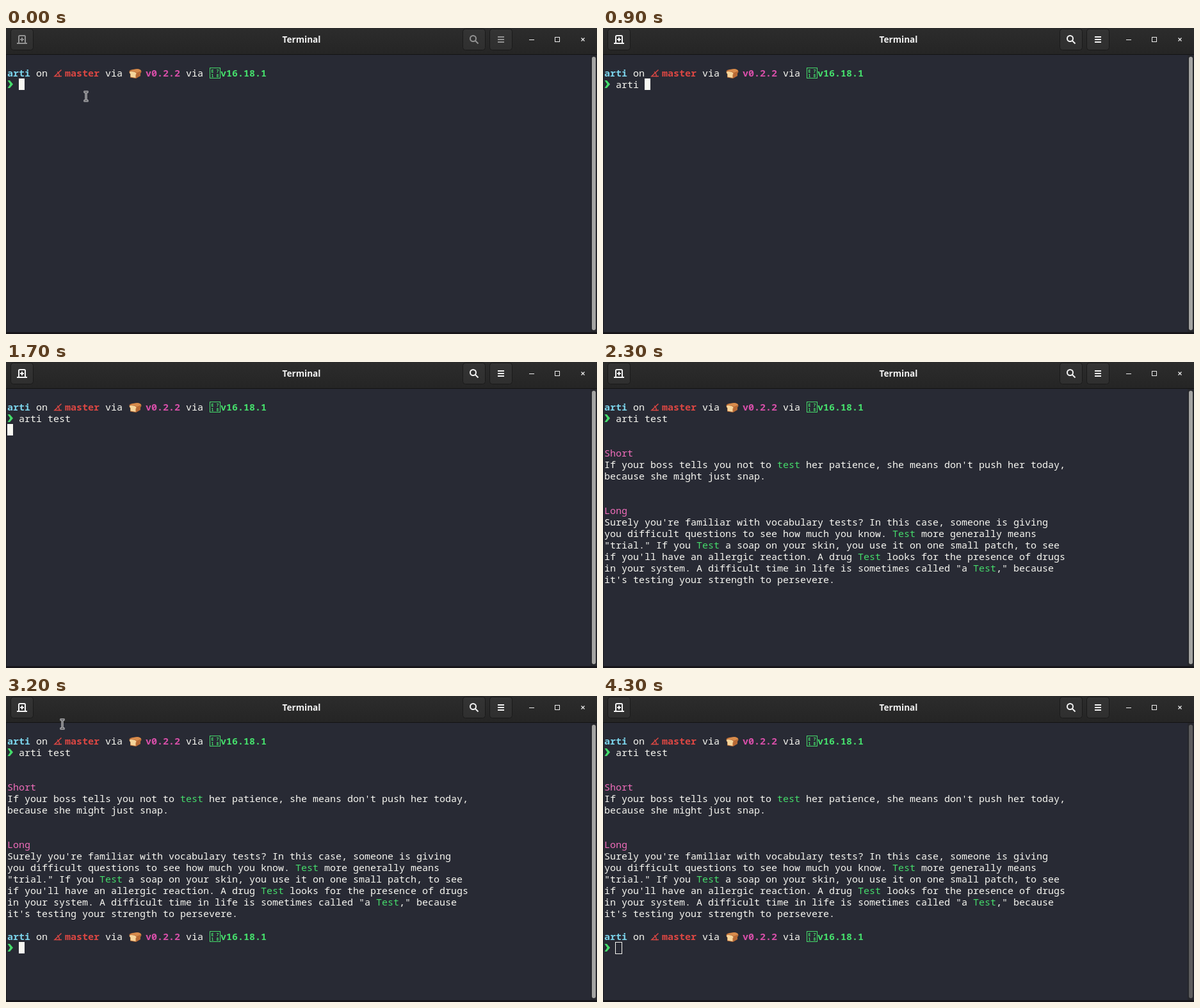
Recreate the animation shown at these times as an HTML page. Size 923 by 479 pixels, loop 4.4 s.

```html
<!DOCTYPE html>
<html lang="en">
<head>
<meta charset="utf-8">
<title>Terminal</title>
<style>
  html, body { margin: 0; width: 100%; height: 100%; overflow: hidden; background: #282a34; }
  svg { display: block; width: 923px; height: 479px; }
  text { white-space: pre; }
  .mono { font: 15px "Noto Sans Mono", "DejaVu Sans Mono", monospace; }
  .bold { font-weight: 700; }
  .title { font: 700 13.6px "Open Sans", "Noto Sans", sans-serif; }
  .tiny { font: 700 6.5px "Noto Sans Mono", monospace; }
</style>
</head>
<body>
<svg viewBox="0 0 923 479" xmlns="http://www.w3.org/2000/svg">
  <defs>
    <linearGradient id="bar" x2="0" y2="1">
      <stop offset="0" stop-color="#2c2c2c"/>
      <stop offset="1" stop-color="#252525"/>
    </linearGradient>
    <linearGradient id="btn" x2="0" y2="1">
      <stop offset="0" stop-color="#343434"/>
      <stop offset="1" stop-color="#2f2f2f"/>
    </linearGradient>
  </defs>

  <rect width="923" height="479" fill="#282a34"/>
  <rect x="913" y="42" width="10" height="435" fill="#26272c"/>
  <rect y="41" width="1" height="438" fill="#191a1f"/>
  <rect y="476" width="923" height="3" fill="#17161a"/>
  <rect id="slider" x="915" y="45" width="6" height="428" rx="3"/>

  <rect width="923" height="41" fill="url(#bar)"/>
  <rect y="41" width="923" height="1" fill="#131313"/>
  <g fill="url(#btn)" stroke="#1a1a1a">
    <rect x="7.5" y="1.5" width="35" height="33" rx="4"/>
    <rect x="713.5" y="1.5" width="35" height="33" rx="4"/>
    <rect x="755.5" y="1.5" width="35" height="33" rx="4"/>
  </g>
  <text class="title" x="461.5" y="23" text-anchor="middle" fill="#f2f2f2">Terminal</text>
  <g id="icons" fill="none" stroke-width="2">
    <path d="M17 24H33M20 24V13.5Q20 12 21.500 12H28.500Q30 12 30 13.500V24M25 15V21M22 18H28"/>
    <circle cx="729.5" cy="16.500" r="4.500"/>
    <path d="M732.500 19.500L737.500 24.500"/>
    <path d="M768 14H778M768 18H778M768 22H778"/>
  </g>
  <g fill="none" stroke="#eeeeee">
    <path d="M817 18.500H825"/>
    <rect x="857.500" y="14.500" width="7" height="7"/>
    <path d="M898.500 15.500L903.500 20.500M903.500 15.500L898.500 20.500" stroke-width="1.200"/>
  </g>

  <g id="prompt1"></g>
  <text id="typed" class="mono" x="20" y="94" fill="#f8f8f2"></text>
  <g id="answer"></g>
  <g id="prompt2"></g>
  <rect id="block" width="9" height="18" fill="#f8f8f2"/>
  <rect id="hollow" x="19.500" y="385.500" width="10" height="18" fill="none" stroke="#f8f8f2"/>
  <g id="beam" fill="none">
    <path d="M-3.500 -7H3.500M-3.500 7H3.500M0 -7V7" stroke="#f4f4f4" stroke-width="3"/>
    <path d="M-3 -7H3M-3 7H3M0 -7V7" stroke="#16171c"/>
  </g>
  <path id="arrow" d="M0 0V15L3.500 11.800L6 17L8.500 16L6.200 10.800H11Z"
        fill="#111" stroke="#f4f4f4" stroke-linejoin="round"/>
</svg>
<script>
const LOOP = 4400, STEP = 100;
const WHITE = "#f8f8f2", GREEN = "#45dc6b", PINK = "#f06dbb", RED = "#dc4743";
const $ = id => document.getElementById(id);
const colX = col => 2 + 9 * col;
const baseY = row => 76 + 18 * row;

const word = (s, col, row, fill, bold) =>
  `<text class="mono${bold ? " bold" : ""}" x="${colX(col)}" y="${baseY(row)}" fill="${fill}">${s}</text>`;

const bread = `
  <path d="M192.500 68Q193 65.500 197 65L205 64Q211 64.500 211.500 68Q211.500 70 210 71V75L203 79L194 77.500V72Q192 70.500 192.500 68Z" fill="#b86a35"/>
  <path d="M197 65.500L205 64Q210.500 64.500 211 67.500L204 70Q202 67 194 67.500Z" fill="#d88c4c"/>
  <path d="M193 69Q194 67.500 199 68.500Q204 69.500 203.500 72L202.500 73V78L194.500 76.500V72Q192.800 71 193 69Z" fill="#f6d59b"/>`;

const missing = `
  <rect x="318.500" y="62.500" width="16" height="16" fill="none" stroke="${GREEN}"/>
  <g class="tiny" fill="${GREEN}">
    <text x="320.500" y="69.500">E</text><text x="328.500" y="69.500">7</text>
    <text x="320.500" y="77">1</text><text x="328.500" y="77">8</text>
  </g>`;

const prompt = [
  word("arti", 0, 0, "#7bd3ea", true),
  word("on", 5, 0, WHITE),
  `<path d="M86.500 65.500L76 75.500H87M80 68.500Q83.500 71 83.500 76.500" fill="none" stroke="${RED}" stroke-width="1.500"/>`,
  word("master", 10, 0, RED, true),
  word("via", 17, 0, WHITE),
  bread,
  word("v0.2.2", 24, 0, "#d84fa9", true),
  word("via", 31, 0, WHITE),
  missing,
  word("v16.18.1", 37, 0, GREEN, true),
  `<path d="M2.500 82H6L11 88L6 94H2.500L6.500 88Z" fill="${GREEN}"/>`
].join("");

// Text between asterisks is highlighted.
function line(s, row) {
  let col = 0;
  return s.split("*").map((part, i) => {
    const out = word(part, col, row, i % 2 ? GREEN : WHITE);
    col += part.length;
    return out;
  }).join("");
}

const short = [
  "If your boss tells you not to *test* her patience, she means don't push her today,",
  "because she might just snap."
];
const long = [
  "Surely you're familiar with vocabulary tests? In this case, someone is giving",
  "you difficult questions to see how much you know. *Test* more generally means",
  "\"trial.\" If you *Test* a soap on your skin, you use it on one small patch, to see",
  "if you'll have an allergic reaction. A drug *Test* looks for the presence of drugs",
  "in your system. A difficult time in life is sometimes called \"a *Test*,\" because",
  "it's testing your strength to persevere."
];

$("prompt1").innerHTML = $("prompt2").innerHTML = prompt;
$("prompt2").setAttribute("transform", "translate(0 306)");
$("answer").innerHTML =
  word("Short", 0, 4, PINK) + short.map((s, i) => line(s, 5 + i)).join("") +
  word("Long", 0, 9, PINK) + long.map((s, i) => line(s, 10 + i)).join("");

// [start time, value]
const typing = [[0, 0], [400, 1], [500, 2], [600, 3], [700, 4], [900, 5], [1100, 7], [1200, 9]];
const pointer = [
  [0, [125, 107]], [100, [124.5, 107.5]], [200, [124, 108]], [400, null],
  [3000, [124, 107]], [3200, [88, 44]], [3300, [68, 8, "arrow"]], [3400, null]
];
const iconTone = [[0, "#929292"], [100, "#c0c0c0"], [200, "#f4f4f4"]];
const sliderTone = [[0, "#a4a4a2"], [4200, "#81817f"], [4300, "#5d5d5d"]];

const at = (track, t) => track.filter(([start]) => start <= t).pop()[1];
const show = (id, on) => $(id).setAttribute("visibility", on ? "visible" : "hidden");

function draw(time) {
  const t = Math.floor((time % LOOP) / STEP) * STEP;
  const count = at(typing, t);
  $("typed").textContent = "arti test".slice(0, count);

  const waiting = t >= 1700, done = t >= 2300;
  show("answer", done);
  show("prompt2", t >= 2500);

  const col = done ? 2 : waiting ? 0 : 2 + count;
  const row = done ? 18 : waiting ? 2 : 1;
  $("block").setAttribute("x", colX(col));
  $("block").setAttribute("y", 61 + 18 * row);
  show("block", !done || (t >= 3000 && t < 3500));
  show("hollow", t >= 4200);

  $("icons").setAttribute("stroke", at(iconTone, t));
  $("slider").setAttribute("fill", at(sliderTone, t));

  const p = at(pointer, t);
  const shape = p && (p[2] || "beam");
  for (const id of ["beam", "arrow"]) {
    show(id, shape === id);
    if (p) $(id).setAttribute("transform", `translate(${p[0]} ${p[1]})`);
  }
}

const begin = performance.now();
function tick() {
  draw(performance.now() - begin);
  requestAnimationFrame(tick);
}
tick();
</script>
</body>
</html>
```
